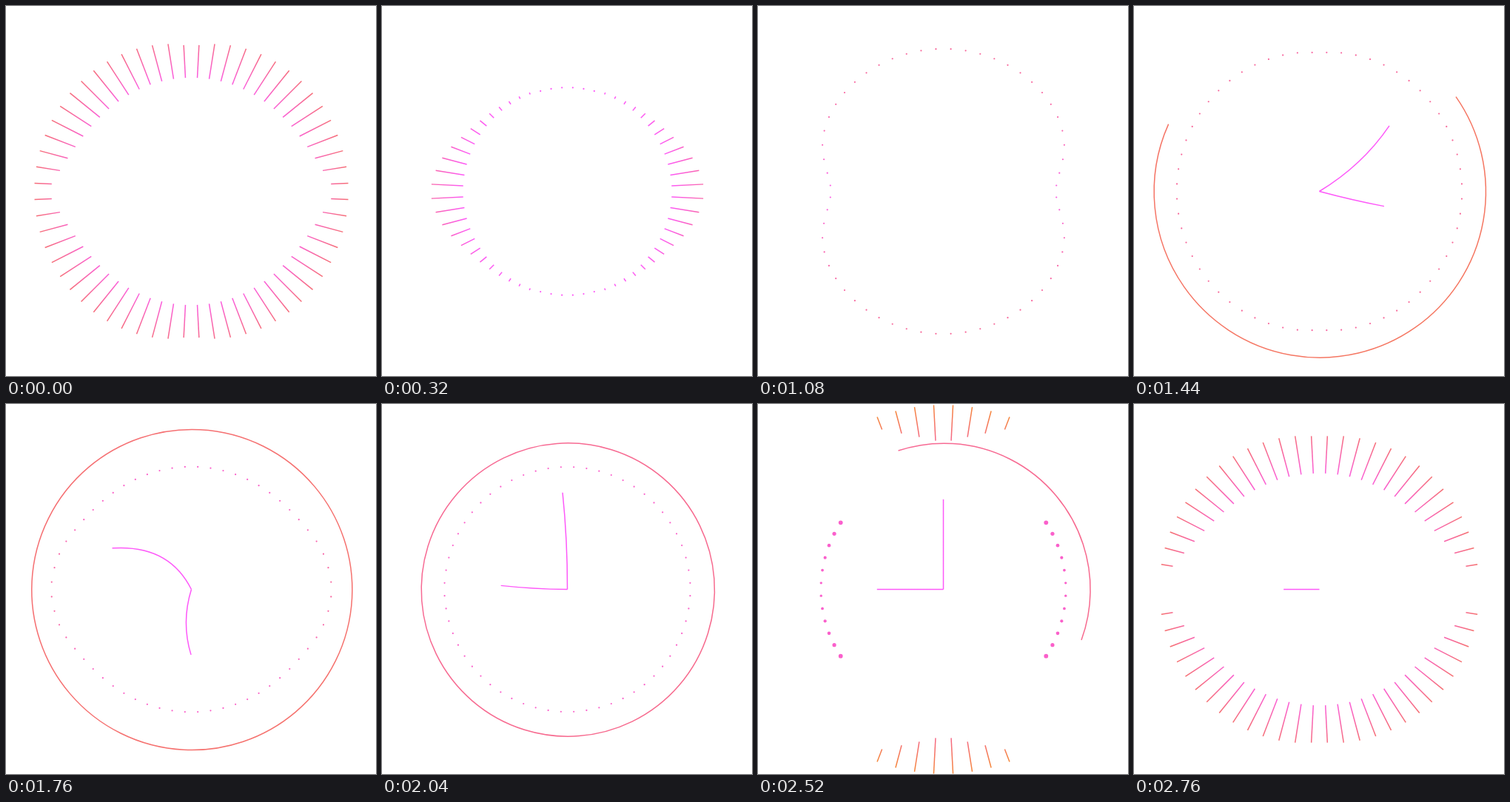
An HTML page with a canvas for the animation above (2800 ms loop, 500x500 px).

```html
<!DOCTYPE html>
<html lang="en">
<head>
<meta charset="utf-8">
<title>Clock loop</title>
<style>
  html, body { margin: 0; width: 100%; height: 100%; overflow: hidden; background: #fff; }
  canvas { display: block; width: 100vw; height: 100vh; }
</style>
</head>
<body>
<canvas id="stage" width="500" height="500"></canvas>
<script>
const ctx = document.getElementById('stage').getContext('2d');
const LOOP = 2800, TAU = Math.PI * 2, RAD = Math.PI / 180;
const STAGGER = 24, ENTER = 2424, VANISH = 2316;

const clamp = x => Math.min(1, Math.max(0, x));
const mod = (x, n) => ((x % n) + n) % n;
const span = (t, start, length) => clamp((t - start) / length);
const inOut = (u, half) => u < 0.5 ? half(2 * u) / 2 : 1 - half(2 - 2 * u) / 2;
const expoIn = u => u <= 0 ? 0 : 2 ** (10 * u - 10);
const expo = u => inOut(clamp(u), expoIn);
const quint = u => inOut(clamp(u), x => x ** 5);

// Smooth curve through [time, value] pairs, flat at both ends
function track(keys, t) {
  const last = keys.length - 1;
  if (t <= keys[0][0]) return keys[0][1];
  if (t >= keys[last][0]) return keys[last][1];
  const i = keys.findIndex(k => k[0] > t) - 1;
  const slope = j => j <= 0 || j >= last ? 0
    : (keys[j + 1][1] - keys[j - 1][1]) / (keys[j + 1][0] - keys[j - 1][0]);
  const [t0, a] = keys[i], [t1, b] = keys[i + 1];
  const d = t1 - t0, u = (t - t0) / d, v = 1 - u;
  return a * (1 + 2 * u) * v * v + b * u * u * (3 - 2 * u)
    + d * u * v * (slope(i) * v - slope(i + 1) * u);
}

const paint = ctx.createRadialGradient(250, 250, 0, 250, 250, 250);
paint.addColorStop(0.56, '#fd58f9');
paint.addColorStop(0.86, '#f56f72');
paint.addColorStop(1, '#f5873a');

// Clockwise from twelve o'clock
const polar = (deg, r) => [250.5 + r * Math.sin(deg * RAD), 250.5 - r * Math.cos(deg * RAD)];

function drawTick(i, t) {
  const deg = 3 + 6 * i;
  const half = i % 30;
  const order = Math.min(half, 29 - half);
  const age = mod(t - ENTER - STAGGER * order, LOOP);
  const time = age + ENTER - LOOP;
  if (time > VANISH) return;

  const shared = age + STAGGER * order;
  const scale = 194 + 56 * (Math.max(0, 806 - shared) / 710) ** 2.2;
  const shift = 53.3 * expo((time - 335) / 912) - 27.5 * expo((time - 1051) / 912);
  const inner = scale * (1 - 0.28 * (1 - 2 ** (-0.0177 * age))) + shift;
  const outer = scale * (1 - 0.28 * expo((age + 130) / 1130)) + shift;

  ctx.beginPath();
  if (outer - inner > 2) {
    ctx.moveTo(...polar(deg, inner));
    ctx.lineTo(...polar(deg, outer));
    ctx.stroke();
  } else if (age > 300) {
    const size = 1.1 + 1.9 * span(time, 2080, 236) ** 1.5;
    ctx.arc(...polar(deg, inner), size, 0, TAU);
    ctx.fill();
  }
}

function drawRing(t) {
  const shown = quint((t - 1145) / 550), erased = quint((t - 2228) / 550);
  if (shown <= erased) return;
  const r = 224.2 - 26.4 * expo((t - 1341) / 912);
  ctx.save();
  ctx.translate(251.3, 251);
  ctx.rotate((0.051 * (t - 1440) - 35) * RAD);
  ctx.beginPath();
  ctx.arc(0, 0, r, TAU * erased, TAU * shown);
  ctx.restore();
  ctx.stroke();
}

const longHand = {
  size: 131, end: 2648,
  angle: t => 360 * quint((t - 868) / 1500),
  lag: [[1150, 2], [1440, 12], [1600, 32], [1760, 36], [2040, 3], [2300, 0]]
};
const shortSwing = [[1150, 90], [1440, 102.8], [1760, 180], [1920, 245], [2040, 273.2], [2280, 270]];
const shortHand = {
  size: 90, end: 2798,
  angle: t => track(shortSwing, t),
  lag: [[1150, 0], [1440, 2], [1760, 17], [1920, 6], [2040, -2.7], [2280, 0]]
};

function drawHand(hand, t) {
  if (t < 1150 || t >= hand.end) return;
  const grown = 1 - 2 ** (-0.03 * (t - 1150));
  const size = hand.size * grown * (1 - 2 ** (0.03 * (t - hand.end)));
  const tip = hand.angle(t), lag = track(hand.lag, t);
  ctx.beginPath();
  ctx.moveTo(...polar(0, 0));
  ctx.quadraticCurveTo(...polar(tip + lag, size * 0.52),
    ...polar(tip, size * Math.cos(lag * 0.64 * RAD)));
  ctx.stroke();
}

function draw(t) {
  ctx.clearRect(0, 0, 500, 500);
  ctx.strokeStyle = ctx.fillStyle = paint;
  ctx.lineWidth = 1.5;
  for (let i = 0; i < 60; i++) drawTick(i, t);
  drawRing(t);
  drawHand(longHand, t);
  drawHand(shortHand, t);
}

const begin = performance.now();
function loop() {
  draw(mod(performance.now() - begin, LOOP));
  requestAnimationFrame(loop);
}
loop();
</script>
</body>
</html>
```
